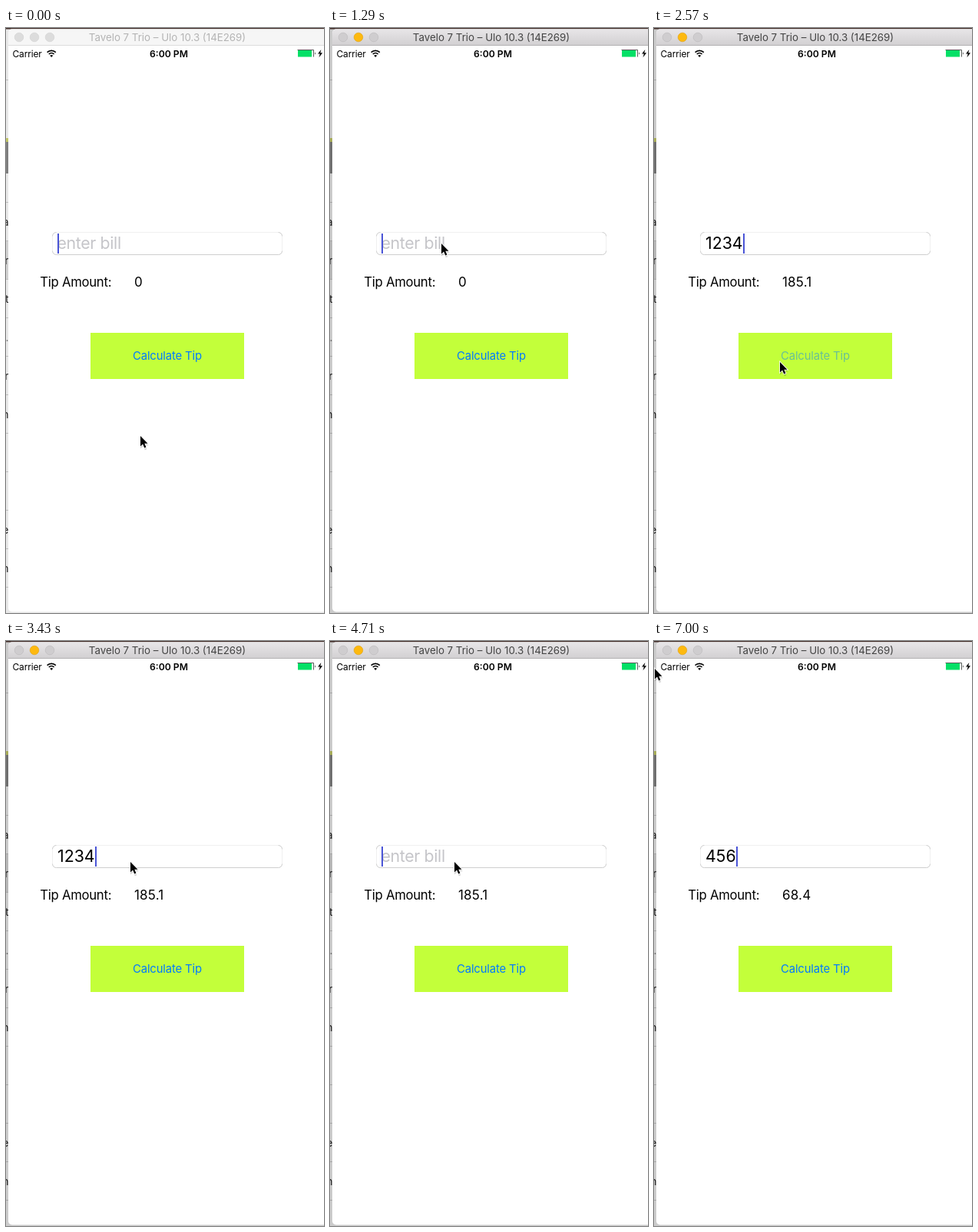
An HTML page that plays this animation: 414 by 760 pixels, repeating every 7140 ms.

```html
<!DOCTYPE html>
<html lang="en">
<head>
<meta charset="utf-8">
<title>Tip calculator</title>
<style>
  html, body { margin: 0; width: 100%; height: 100%; overflow: hidden; background: #fff; }
  svg { display: block; width: 414px; height: 760px; font-family: Inter, "Open Sans", sans-serif; }
  .field { font-size: 21.3px; }
  .hint { letter-spacing: -.35px; }
  .label { font-size: 16.7px; letter-spacing: -.27px; }
  .amount { font-size: 17px; letter-spacing: .2px; }
  .button { font-size: 14.8px; letter-spacing: -.12px; }
  .menu { font-size: 14px; letter-spacing: -.2px; fill: #fff; }
</style>
</head>
<body>
<svg viewBox="0 0 414 760">
  <defs>
    <linearGradient id="bar" x1="0" y1="0" x2="0" y2="1">
      <stop offset="0" stop-color="#e8e6e8"/>
      <stop offset="1" stop-color="#d1cfd1"/>
    </linearGradient>
  </defs>

  <!-- window behind, seen as a thin strip -->
  <rect width="414" height="760" fill="#f4f4f4"/>
  <rect y="143" width="4" height="46" fill="#858585"/>
  <rect y="143" width="4" height="5" fill="#c9cf6a"/>
  <rect y="276" width="4" height="50" fill="#dcdcdc"/>
  <g id="rows" font-size="14" text-anchor="end"></g>
  <rect id="shade" width="414" height="760" fill="#000"/>
  <rect width="414" height="1.5" fill="#3f2a26"/>

  <!-- simulator window -->
  <rect x="3" y="1.5" width="420" height="757" rx="5" fill="#fff"/>
  <path id="titleBar" d="M3 23V6.5a5 5 0 0 1 5-5H414V23z"/>
  <rect id="barLine" x="3" y="22" width="411" height="1"/>
  <g id="lights" stroke-width=".6">
    <circle cx="17" cy="12" r="5.8"/>
    <circle cx="37" cy="12" r="5.8"/>
    <circle cx="57" cy="12" r="5.8"/>
  </g>
  <text id="title" x="210" y="17" font-size="13.3" text-anchor="middle">Tavelo 7 Trio – Ulo 10.3 (14E269)</text>

  <!-- status bar -->
  <text x="8.5" y="38" font-size="11.9" letter-spacing="-.1">Carrier</text>
  <g fill="none" stroke="#000" stroke-width="1.7">
    <path d="M53.6 31.6a8 8 0 0 1 11.2 0M55.8 34a5 5 0 0 1 6.8 0"/>
    <path d="M59.2 38l-2-2.2a3 3 0 0 1 4 0z" fill="#000" stroke="none"/>
  </g>
  <text x="212" y="38" font-size="12.2" font-weight="600" text-anchor="middle">6:00 PM</text>
  <rect x="380" y="29" width="18" height="8.500" fill="#04e066"/>
  <path d="M379.500 28.500H400.500V37.500" fill="none" stroke="#333" stroke-width=".8"/>
  <path d="M402 31.3q1.6 1.7 0 3.4z"/>
  <path d="M410.3 28l-4.3 5.6h2.7l-1.2 4.6 4.5-6h-2.8z"/>

  <!-- app -->
  <rect x="60.5" y="265.5" width="299" height="29" rx="5" fill="#fff" stroke="#f0f0f0"/>
  <path d="M60.5 289.500a5 5 0 0 0 5 5H354.500a5 5 0 0 0 5-5M60.500 270.500a5 5 0 0 1 5-5M354.500 265.500a5 5 0 0 1 5 5" fill="none" stroke="#cbcbcb" stroke-width=".9"/>
  <text id="hint" class="field hint" x="66.5" y="287" fill="#c5c5c9">enter bill</text>
  <text id="bill" class="field" x="67" y="287"></text>
  <rect id="caret" y="267" width="2" height="26" fill="#4a54d6"/>
  <text class="label" x="44.3" y="336">Tip Amount:</text>
  <text id="tip" class="amount" x="167" y="336"></text>
  <rect x="110" y="396" width="200" height="60" fill="#c3ff3a"/>
  <text id="calc" class="button" x="210" y="431" text-anchor="middle" fill="#007aff">Calculate Tip</text>

  <g id="menu">
    <path d="M40 213H194a8 8 0 0 1 8 8V241a8 8 0 0 1-8 8H126L117 257.500 108 249H40a8 8 0 0 1-8-8V221a8 8 0 0 1 8-8z" fill="#282828"/>
    <text class="menu" x="50" y="235">Select</text>
    <text class="menu" x="124" y="235">Select All</text>
  </g>

  <g id="pointer">
    <path d="M0 1V16.500L3.600 13.200 5.800 18.300 8.400 17.200 6.300 12.200H10.800z" fill="#000" opacity=".16"/>
    <path d="M0 0V13.400L3.100 10.500 5.200 15.500 7.400 14.500 5.300 9.700H9.500z" stroke="#fff" stroke-width="1.600" paint-order="stroke"/>
  </g>
</svg>
<script>
const LOOP = 7140, STEPS = 50, STEP = LOOP / STEPS;
const $ = id => document.getElementById(id);
const set = (el, attrs) => { for (const k in attrs) el.setAttribute(k, attrs[k]); };
const clamp = v => Math.min(1, Math.max(0, v));
const ease = v => v * v * (3 - 2 * v);

// step, x, y of the pointer tip
const PATH = [
  [0, 175, 530], [4, 145, 280], [13, 145, 280], [16, 164, 434], [20, 164, 434],
  [24, 162, 287], [37, 162, 287], [41, 176, 400.5], [42, 178, 413], [45, 178, 413], [47, 1, 36]
];

function pointerAt(s) {
  const i = PATH.findIndex(p => p[0] > s);
  if (i < 0) return PATH[PATH.length - 1].slice(1);
  const [s0, x0, y0] = PATH[i - 1], [s1, x1, y1] = PATH[i];
  const k = ease((s - s0) / (s1 - s0));
  return [x0 + (x1 - x0) * k, y0 + (y1 - y0) * k];
}

function billAt(s) {
  if (s < 30) return "1234".slice(0, Math.max(0, s - 9));
  if (s < 34) return "1234".slice(0, 33 - s);
  return "456".slice(0, Math.max(0, s - 34));
}

// a press dims the caption, which fades back after release
function captionAt(s) {
  const press = s < 44 ? 16 : 44;
  if (s < press) return 1;
  return clamp(.2 + .8 * Math.max(0, s - press - 1) / 3);
}

function render(ms) {
  const s = Math.floor((ms % LOOP) / STEP + .05) % STEPS;
  const active = s >= 6;
  set($("shade"), { opacity: active ? .17 : .05 });
  set($("titleBar"), { fill: active ? "url(#bar)" : "#f6f6f6" });
  set($("barLine"), { fill: active ? "#b3b1b3" : "#dcdcdc" });
  set($("title"), { fill: active ? "#444" : "#b4b4b4" });
  [...$("lights").children].forEach((c, i) => {
    const amber = active && i === 1;
    set(c, {
      fill: amber ? "#fdb90f" : active ? "#cfcdcf" : "#dcdcdc",
      stroke: amber ? "#e0a010" : active ? "#bbb9bb" : "#d0d0d0"
    });
  });

  const bill = billAt(s);
  $("bill").textContent = bill;
  set($("hint"), { visibility: bill ? "hidden" : "visible" });
  const width = bill ? $("bill").getComputedTextLength() : 0;
  set($("caret"), { x: Math.round(67 + width) });
  $("tip").textContent = s < 17 ? "0" : s < 45 ? "185.1" : "68.4";
  set($("calc"), { opacity: captionAt(s) });
  set($("menu"), { opacity: s < 30 ? clamp((s - 26) / 2) : 0 });

  const [x, y] = pointerAt(s);
  set($("pointer"), { transform: `translate(${x.toFixed(1)} ${y.toFixed(1)})` });
}

function buildRows() {
  let out = "";
  for (let y = 226; y < 760; y += 50) out += `<rect y="${y}" width="4" height="1" fill="#c8c8c8"/>`;
  out += '<rect y="67" width="4" height="1" fill="#c8c8c8"/>';
  [..."art.rn  en"].forEach((ch, i) => {
    out += `<text x="3.5" y="${257 + 50 * i}" fill="${ch === "." ? "#777" : "#222"}">${ch}</text>`;
  });
  $("rows").innerHTML = out;
}

buildRows();
const start = performance.now();
(function tick() {
  render(performance.now() - start);
  requestAnimationFrame(tick);
})();
</script>
</body>
</html>
```
